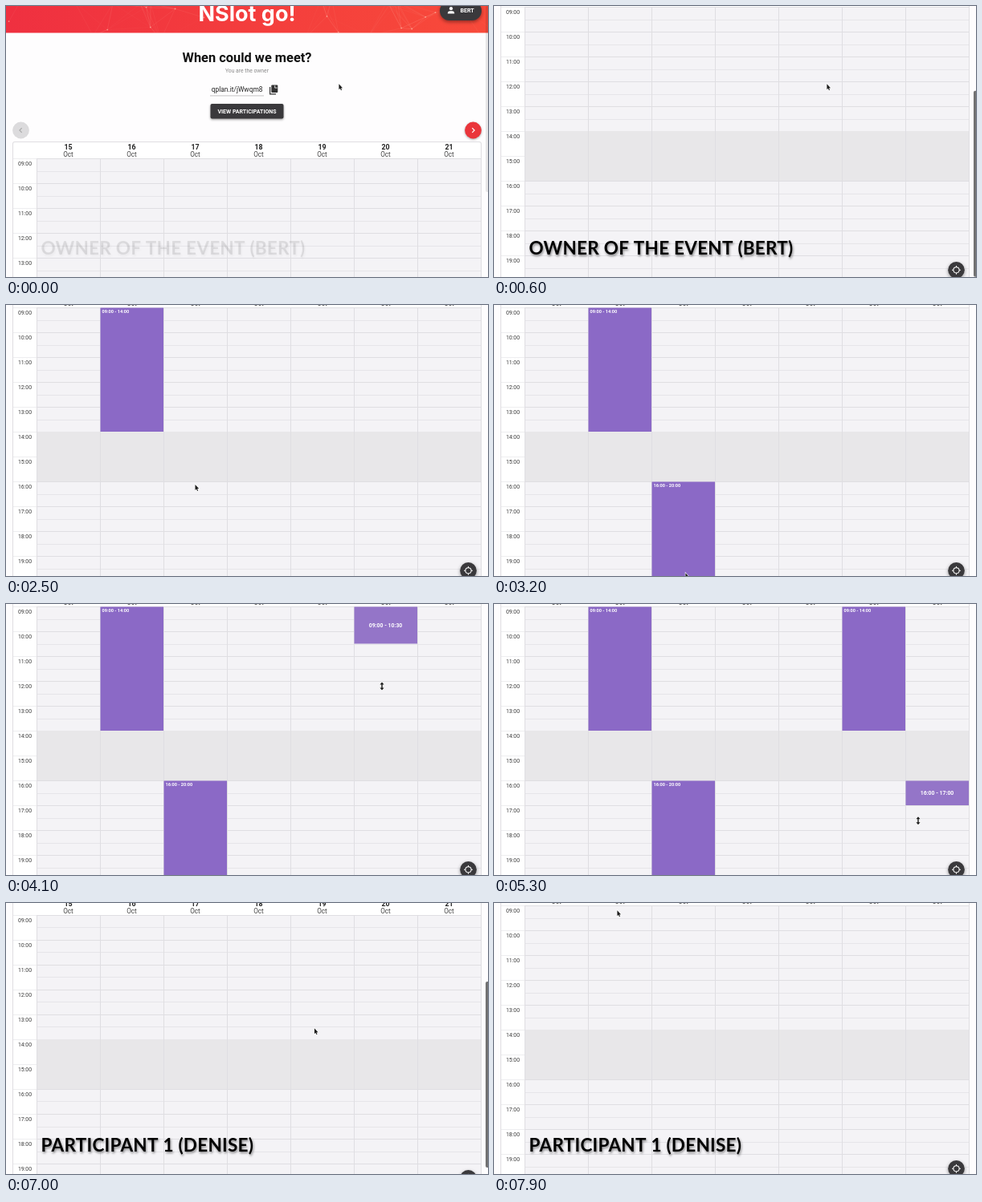
Write an HTML page with a canvas that moves like this. It is 600 px wide and 338 px high and loops after 8 s.

```html
<!DOCTYPE html>
<html lang="en">
<head>
<meta charset="utf-8">
<title>Meeting planner</title>
<style>
html, body { margin: 0; width: 100%; height: 100%; overflow: hidden; background: #fff; }
canvas { display: block; width: 600px; height: 338px; }
</style>
</head>
<body>
<canvas id="stage"></canvas>
<script>
const W = 600, H = 338, LOOP = 8000, STEP = 100;
const GRID_TOP = 190, HOUR = 31, COL_X = 38, COL_W = 79, GRID_W = 7 * COL_W;
const SCROLL_END = 187, BOUNCE = 2;
const FADE_FROM = 5800, FADE_TO = 6350;
const PULL = 400, HOLD = 500;
const DARK = '#3a393c', LINE = '#dfdee2', HALF_LINE = '#e6e5e9';

const scale = window.devicePixelRatio || 1;
function makeLayer(canvas) {
  canvas.width = W * scale;
  canvas.height = H * scale;
  const c = canvas.getContext('2d');
  c.scale(scale, scale);
  return c;
}
const stage = makeLayer(document.getElementById('stage'));
const layer = makeLayer(document.createElement('canvas'));
let ctx = stage;

const ramp = (t, from, to) => Math.min(1, Math.max(0, (t - from) / (to - from)));
const ease = (t, from, to) => {
  const u = ramp(t, from, to);
  return u * u * (3 - 2 * u);
};
const mix = (a, b, k) => a + (b - a) * k;

// A slot is dragged open at `from` with the pointer at `x`.
const owner = {
  user: 'BERT', pillX: 540, title: 'OWNER OF THE EVENT (BERT)',
  start: 0, titleEnd: 1900, rest: { x: 414, y: 97 },
  slots: [
    { col: 1, start: 9, end: 14, from: 1600, x: 153 },
    { col: 2, start: 16, end: 20, from: 2650, x: 238 },
    { col: 5, start: 9, end: 14, from: 3870, x: 468 },
    { col: 6, start: 16, end: 18, from: 5034, x: 528 }
  ]
};
const guest = {
  user: 'LOG IN', pillX: 535, title: 'PARTICIPANT 1 (DENISE)',
  start: 6500, titleEnd: LOOP, rest: { x: 383.5, y: 156 },
  slots: [{ col: 1, start: 9, end: 14, from: 7950, x: 153 }]
};

const slotTop = s => GRID_TOP + (s.start - 9) * HOUR;
const isDragging = (s, t) => t >= s.from + STEP && t < s.from + HOLD;

function cursorAt(page, t) {
  let { x, y } = page.rest;
  for (const s of page.slots) {
    const top = slotTop(s) - SCROLL_END;
    const bottom = Math.min(H - 4, top + (s.end - s.start) * HOUR + 4);
    const travel = ease(t, s.from - 550, s.from - 100);
    x = mix(x, s.x, travel);
    y = mix(y, top + 6, travel);
    y = mix(y, bottom, ease(t, s.from, s.from + PULL));
  }
  return { x, y };
}

function scrollAt(page, t) {
  const d = t - page.start;
  return (SCROLL_END + BOUNCE) * ease(d, 0, 600) - BOUNCE * ease(d, 600, 800);
}

function text(s, x, y, size, color, { weight = 400, align = 'center', font = 'Roboto', spacing = 0 } = {}) {
  ctx.font = `${weight} ${size}px ${font}, sans-serif`;
  ctx.letterSpacing = spacing + 'px';
  ctx.textAlign = align;
  ctx.textBaseline = 'alphabetic';
  ctx.fillStyle = color;
  ctx.fillText(s, x, y);
  const width = ctx.measureText(s).width;
  ctx.letterSpacing = '0px';
  return width;
}
function rect(x, y, w, h, color) {
  ctx.fillStyle = color;
  ctx.fillRect(x, y, w, h);
}
function round(x, y, w, h, r, color) {
  ctx.beginPath();
  ctx.roundRect(x, y, w, h, r);
  ctx.fillStyle = color;
  ctx.fill();
}
function disc(x, y, r, color) {
  ctx.beginPath();
  ctx.arc(x, y, r, 0, 7);
  ctx.fillStyle = color;
  ctx.fill();
}
function line(points, color, width) {
  ctx.beginPath();
  points.forEach(([x, y]) => ctx.lineTo(x, y));
  ctx.strokeStyle = color;
  ctx.lineWidth = width;
  ctx.stroke();
}
function shadowed(blur, dx, dy, alpha, draw) {
  ctx.save();
  ctx.shadowColor = `rgba(0,0,0,${alpha})`;
  ctx.shadowBlur = blur * scale;
  ctx.shadowOffsetX = dx * scale;
  ctx.shadowOffsetY = dy * scale;
  draw();
  ctx.restore();
}

function seeded(seed) {
  return () => (seed = (seed * 16807) % 2147483647) / 2147483647;
}
const rand = seeded(4711);
const motes = Array.from({ length: 34 }, () => ({
  x: rand() * 640 - 20, y: rand() * 70 - 28, vx: rand() * 8 - 4, vy: rand() * 4 - 2
}));

function banner(t) {
  const g = ctx.createLinearGradient(0, 0, W, 0);
  g.addColorStop(0, '#ef3040');
  g.addColorStop(1, '#f84a3a');
  ctx.save();
  ctx.beginPath();
  ctx.rect(0, -20, W, 53.5);
  ctx.clip();
  rect(0, -20, W, 54, g);
  const pts = motes.map(m => [m.x + m.vx * t / 1000, m.y + m.vy * t / 1000]);
  pts.forEach((p, i) => {
    disc(...p, .9, 'rgba(255,225,200,.5)');
    for (const q of pts.slice(i + 1)) {
      const d = Math.hypot(p[0] - q[0], p[1] - q[1]);
      if (d < 65) line([p, q], `rgba(255,215,195,${.32 * (1 - d / 65)})`, .6);
    }
  });
  ctx.restore();
  text('NSlot go!', 300, 18.8, 27, '#fff', { weight: 700, font: 'Inter' });
}

function userPill(page) {
  shadowed(4, 0, 2, .4, () => round(page.pillX, -6, 592 - page.pillX, 24, 12, DARK));
  const x = page.pillX + 14;
  disc(x, 3.2, 2.1, '#fff');
  round(x - 4.2, 6.2, 8.4, 3.4, [3, 3, 0, 0], '#fff');
  text(page.user, page.pillX + 25.5, 8.3, 7.1, '#fff', { weight: 700, align: 'left' });
}

function copyIcon(x, y) {
  line([[x + .6, y + 2.5], [x + .6, y + 11.4], [x + 8, y + 11.4]], '#333', 1.2);
  round(x + 2.3, y, 8, 9.6, 1, '#333');
  line([[x + 6.7, y + .8], [x + 6.7, y + 3.6], [x + 9.6, y + 3.6]], '#fff', .8);
}

function pager(x, dir, color, ink, shadow) {
  shadowed(3, 0, 1, shadow, () => disc(x, 155, 10.4, color));
  line([[x - dir * 1.2, 152.2], [x + dir * 1.6, 155], [x - dir * 1.2, 157.8]], ink, 1.2);
}

function subtitle(page) {
  const y = 83.2, size = 6.75;
  if (page === owner) {
    text('You are the owner', 300, y, size, '#888');
    return;
  }
  let x = 231;
  x += text('Participating anonymously as: ', x, y, size, '#777', { align: 'left' });
  x += text('Denise ', x, y, size, '#444', { align: 'left', weight: 700 });
  const w = text('Change', x, y, size, '#444', { align: 'left' });
  rect(x, y + 1, w, .6, '#444');
}

function intro(page) {
  text('When could we meet?', 300, 70.2, 16.4, '#111', { weight: 700 });
  subtitle(page);
  text('qplan.it/jWwqm8', 255.8, 107, 8.4, '#222', { align: 'left' });
  rect(254, 111.6, 67, .7, '#aaa');
  copyIcon(328, 98.5);
  shadowed(3, 0, 1.2, .4, () => round(254.5, 122, 91, 18.5, 2, DARK));
  text('VIEW PARTICIPATIONS', 300, 133.7, 7, '#fff', { weight: 700 });
  pager(18.5, -1, '#dcdbdd', '#aaa', 0);
  pager(581.5, 1, '#ea353b', '#fff', .35);
}

function calendar(scroll) {
  round(8, 169, 584, 500, 3, LINE);
  round(9, 170, 582, 500, 2, '#fff');
  for (let d = 0; d < 7; d++) {
    const x = COL_X + (d + .5) * COL_W;
    text(15 + d, x, 178.5, 8.8, '#222', { weight: 700 });
    text('Oct', x, 188, 8.2, '#444');
  }
  rect(COL_X, GRID_TOP, GRID_W, 400, '#f4f3f6');
  for (let i = 0; i < 24; i++) {
    const exact = GRID_TOP + i * HOUR / 2;
    const y = Math.round(exact - scroll) + scroll;
    const onHour = i % 2 === 0;
    rect(COL_X, y, GRID_W, 1, onHour ? LINE : HALF_LINE);
    if (onHour) {
      rect(9, y, 29, 1, '#eeeef0');
      text(clock(9 + i / 2), 23.5, exact + 9.3, 6.9, '#3a3a3a');
    }
  }
  rect(COL_X, GRID_TOP + 5 * HOUR, GRID_W, 2 * HOUR, '#e8e7e9');
  for (let d = 0; d <= 7; d++) rect(COL_X + d * COL_W, GRID_TOP, 1, 400, LINE);
}

function clock(h) {
  return String(Math.floor(h)).padStart(2, '0') + (h % 1 ? ':30' : ':00');
}

function slotBox(s, page, t) {
  if (t < s.from + STEP) return;
  const dragging = isDragging(s, t);
  const top = slotTop(s);
  let end = s.end;
  if (dragging) {
    // The block trails the pointer by one step and snaps to half hours.
    const y = cursorAt(page, t - STEP).y + SCROLL_END;
    const halves = Math.ceil((y - top) / (HOUR / 2));
    end = Math.min(s.end, s.start + halves / 2);
  }
  const x = COL_X + s.col * COL_W;
  const h = (end - s.start) * HOUR;
  rect(x + .5, top + .5, COL_W - .5, h - .5, dragging ? '#9475c8' : '#8b69c6');
  const label = `${clock(s.start)} - ${clock(end)}`;
  if (dragging) text(label, x + COL_W / 2, top + h / 2 + 2.6, 6.9, '#fff', { weight: 700 });
  else text(label, x + 2.5, top + 7, 5.6, '#fff', { weight: 700, align: 'left' });
}

function locateButton() {
  const x = 575.5, y = 518.3;
  shadowed(4, 0, 1.5, .4, () => disc(x, y, 10.3, DARK));
  disc(x, y, 4.1, '#fff');
  disc(x, y, 3.1, DARK);
  for (let i = 0; i < 4; i++) {
    const dx = Math.cos(i * Math.PI / 2), dy = Math.sin(i * Math.PI / 2);
    line([[x + dx * 3.4, y + dy * 3.4], [x + dx * 5.4, y + dy * 5.4]], '#fff', 1);
  }
}

function outlined(points) {
  ctx.beginPath();
  points.forEach(([x, y]) => ctx.lineTo(x, y));
  ctx.closePath();
  ctx.strokeStyle = '#fff';
  ctx.lineWidth = 1.2;
  ctx.stroke();
  ctx.fillStyle = '#1c1c1c';
  ctx.fill();
}

function pointer({ x, y }, resizing) {
  ctx.save();
  ctx.translate(x, y);
  if (resizing) {
    for (const dir of [-1, 1]) outlined([[0, dir * 5], [2.6, dir * 2], [-2.6, dir * 2]]);
    rect(-.7, -3, 1.4, 6, '#1c1c1c');
  } else {
    outlined([[.4, .3], [.4, 7.2], [1.9, 5.8], [3, 8.2], [4, 7.8], [3, 5.5], [5, 5.2]]);
  }
  ctx.restore();
}

function overlayTitle(page, t) {
  const alpha = ramp(t, page.start - 50, page.start + 500) * (1 - ramp(t, page.titleEnd, page.titleEnd + 500));
  if (!alpha) return;
  shadowed(3, 1, 2, .45, () => {
    ctx.globalAlpha = alpha;
    text(page.title, 43.5, 310.3, 22.5, '#000', { weight: 700, align: 'left', font: 'Lato', spacing: .25 });
  });
}

function scrollbar(page, t, scroll) {
  const d = t - page.start;
  const alpha = .55 * ramp(d, -20, 100) * (1 - ramp(d, 1000, 1300));
  if (alpha) round(597, scroll * .56, 5, 232, 2, `rgba(0,0,0,${alpha})`);
}

function scene(page, t) {
  const scroll = scrollAt(page, t);
  rect(0, 0, W, H, '#fefdfe');
  ctx.save();
  ctx.translate(0, -scroll);
  banner(t);
  userPill(page);
  intro(page);
  calendar(scroll);
  page.slots.forEach(s => slotBox(s, page, t));
  locateButton();
  ctx.restore();
  scrollbar(page, t, scroll);
  overlayTitle(page, t);
  pointer(cursorAt(page, t), page.slots.some(s => isDragging(s, t)));
}

function render(t) {
  ctx = stage;
  if (t >= FADE_TO) return scene(guest, t);
  scene(owner, t);
  if (t <= FADE_FROM) return;
  ctx = layer;
  scene(guest, t);
  stage.globalAlpha = ramp(t, FADE_FROM, FADE_TO);
  stage.drawImage(layer.canvas, 0, 0, W, H);
  stage.globalAlpha = 1;
}

const begin = performance.now();
function tick() {
  const t = (performance.now() - begin) % LOOP;
  render(Math.floor(t / STEP) * STEP);
  requestAnimationFrame(tick);
}
tick();
</script>
</body>
</html>
```
